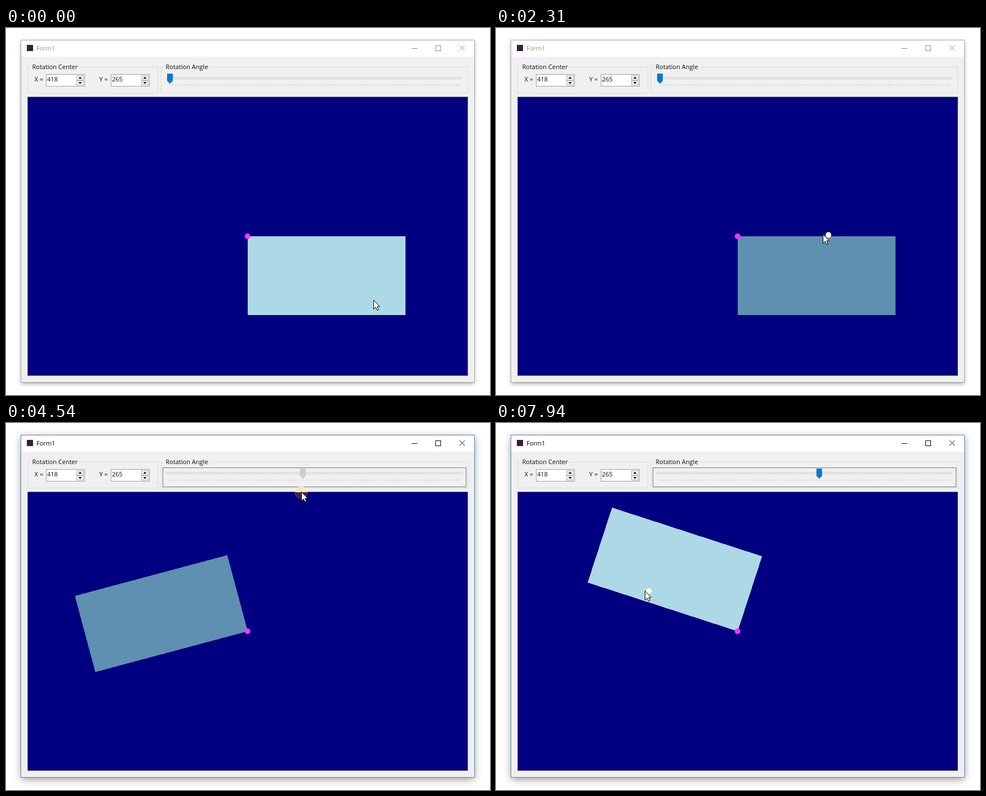
An HTML page for the animation above (8 s loop, 859 by 652 pixels).

```html
<!DOCTYPE html>
<html lang="en">
<head>
<meta charset="utf-8">
<title>Rotation demo</title>
<style>
  html, body { margin: 0; width: 100%; height: 100%; overflow: hidden; background: #fff; }
  svg { display: block; width: 100%; height: 100%; }
  text { font: 11px "Open Sans", "Noto Sans", sans-serif; fill: #0c0c1c; }
  .crisp { shape-rendering: crispEdges; }
  #shadowOn, #focus { visibility: hidden; }
  #frame { stroke: #a8a8a8; }
  #caption { fill: #999e6c; }
  #buttons { stroke: #8c8c8c; }
  .active #shadowOn, .active #focus { visibility: visible; }
  .active #shadowOff { visibility: hidden; }
  .active #frame { stroke: #5a89b0; }
  .active #caption { fill: #000; }
  .active #buttons { stroke: #000; }
</style>
</head>
<body>
<svg id="stage" viewBox="0 0 859 652">
  <defs>
    <clipPath id="panelClip"><rect x="39" y="123" width="780" height="494"/></clipPath>
    <filter id="soft" x="-5%" y="-5%" width="110%" height="112%">
      <feDropShadow dx="0" dy="2" stdDeviation="3.5" flood-color="#000" flood-opacity=".36"/>
    </filter>
    <filter id="deep" x="-5%" y="-5%" width="110%" height="112%">
      <feDropShadow dx="0" dy="3" stdDeviation="7" flood-color="#000" flood-opacity=".42"/>
    </filter>
    <g id="spinner">
      <rect x="71.5" y="82.5" width="68" height="21" fill="#fff" stroke="#a0a0a0"/>
      <rect x="125.5" y="84.5" width="12" height="8" fill="#f0f0f0" stroke="#b4b4b4"/>
      <rect x="125.5" y="93.5" width="12" height="8" fill="#f0f0f0" stroke="#b4b4b4"/>
      <path d="M128.5 90l3-3.5 3 3.5zM128.5 96l3 3.5 3-3.5z" fill="#111"/>
    </g>
  </defs>

  <rect id="shadowOff" x="27" y="22" width="804" height="608" fill="#fff" filter="url(#soft)"/>
  <rect id="shadowOn" x="27" y="22" width="804" height="608" fill="#fff" filter="url(#deep)"/>
  <g class="crisp">
    <rect id="frame" x="26.5" y="21.5" width="805" height="608" fill="#f0f0f0"/>
    <rect x="27" y="22" width="804" height="29" fill="#fff"/>
    <rect x="37" y="30" width="11" height="11" fill="#3a1c42"/>
  </g>
  <text id="caption" x="54" y="40">Form1</text>
  <g id="buttons" fill="none">
    <path d="M720 36.5h10M762.5 31.5h9v9h-9z" class="crisp"/>
    <path d="M805 31l9 9M814 31l-9 9"/>
  </g>

  <path d="M45 69.5H38.5V115.5H269.5V69.5H127M282 69.5H275.5V115.5H819.5V69.5H360" fill="none" stroke="#dcdcdc" class="crisp"/>
  <text x="46.5" y="73">Rotation Center</text>
  <text x="283.5" y="73">Rotation Angle</text>
  <use href="#spinner"/>
  <use href="#spinner" x="115"/>
  <text x="50.5" y="95">X =</text>
  <text x="73" y="95">418</text>
  <text x="165.5" y="95">Y =</text>
  <text x="188" y="95">265</text>

  <rect x="285.5" y="87.5" width="524" height="3" fill="#e7eaea" stroke="#d6d6d6" class="crisp"/>
  <path d="M290.5 101.5H806" stroke="#c2c2c2" stroke-width="3" stroke-dasharray="1 4.14"/>
  <rect id="focus" x="278.5" y="79.5" width="538" height="34" fill="none" stroke="#000" stroke-dasharray="1 1"/>
  <path id="thumb" d="M-5 81H5V94L0 99L-5 94z"/>

  <rect x="38.5" y="122.5" width="781" height="495" fill="#000080" stroke="#646464" class="crisp"/>
  <g clip-path="url(#panelClip)">
    <rect id="box" width="280" height="140" class="crisp"/>
    <circle cx="428.7" cy="370" r="5" fill="#ff33ff"/>
    <circle id="dot" r="5" fill="#ffffcc"/>
  </g>
  <g id="halo">
    <circle r="11" fill="#f0ebbd"/>
    <circle r="11" fill="#4b1d48" clip-path="url(#panelClip)"/>
  </g>
  <path id="arrow" d="M.5 .5V16.5L4.2 13L6.7 18.4L9.2 17.3L6.8 12H11.4z" stroke="#000"/>
</svg>

<script>
const LOOP = 8000, LAG = 60;
const PRESS = 2880, RELEASE = 4950;
const PIVOT = { x: 429, y: 370 };

// Slider drag: time, angle
const turn = [[PRESS, 0], [4030, 239], [4390, 165], [4540, 165], [4870, 198]];

// Pointer weaving over the edges before and after the drag: time, x, y
const before = [
  [0, 652, 483], [420, 575, 347], [840, 422, 440], [1000, 385, 480],
  [1190, 438, 483], [1440, 490, 535], [1680, 590, 504], [2000, 726, 425],
  [2150, 616, 360], [2310, 580, 366], [2530, 530, 262], [PRESS, 289, 94]
];
const after = [
  [RELEASE, 571, 122], [5400, 476, 268], [5630, 456, 280], [5900, 440, 285],
  [6450, 368, 354], [6650, 371, 363], [7030, 358, 347], [7270, 327, 318],
  [7500, 298, 338], [7640, 300, 304], [7940, 264, 298]
];

const $ = id => document.getElementById(id);
const [stage, box, dot, halo, arrow, thumb] =
  ["stage", "box", "dot", "halo", "arrow", "thumb"].map($);

// The key before t, clamped so that a next key exists.
const keyAt = (keys, t) =>
  Math.max(0, Math.min(keys.length - 2, keys.findLastIndex(k => k[0] <= t)));
const clamp = u => Math.max(0, Math.min(1, u));

function angleAt(t) {
  const i = keyAt(turn, t), [t0, a] = turn[i], [t1, b] = turn[i + 1];
  const u = clamp((t - t0) / (t1 - t0));
  return Math.round(a + (b - a) * (1 - Math.cos(Math.PI * u)) / 2);
}

// Smooth curve through the keys, with uneven spacing in time.
function curve(keys, t, col) {
  const last = keys.length - 1;
  const slope = n => {
    const a = keys[Math.max(n - 1, 0)], b = keys[Math.min(n + 1, last)];
    return (b[col] - a[col]) / (b[0] - a[0]);
  };
  const i = keyAt(keys, t), a = keys[i], b = keys[i + 1], d = b[0] - a[0];
  const u = clamp((t - a[0]) / d), v = 1 - u;
  return a[col] * v * v * (1 + 2 * u) + b[col] * u * u * (3 - 2 * u)
    + d * u * v * (slope(i) * v - slope(i + 1) * u);
}

const thumbX = angle => 291 + angle * 514 / 360;
const isDrag = t => t >= PRESS && t < RELEASE;

function pointer(t) {
  if (isDrag(t)) {
    return { x: thumbX(angleAt(t)) - 2.4, y: 94 + 28 * clamp((t - PRESS) / 900) };
  }
  const keys = t < PRESS ? before : after;
  return { x: curve(keys, t, 1), y: curve(keys, t, 2) };
}

function inBox(p, angle) {
  const a = angle * Math.PI / 180, dx = p.x - PIVOT.x, dy = p.y - PIVOT.y;
  const u = dx * Math.cos(a) + dy * Math.sin(a);
  const v = dy * Math.cos(a) - dx * Math.sin(a);
  return u >= 0 && u <= 280 && v >= 0 && v <= 140;
}

const place = (el, p) => el.setAttribute("transform", `translate(${p.x} ${p.y})`);
const show = (el, on) => el.setAttribute("visibility", on ? "visible" : "hidden");

function draw(t) {
  const angle = angleAt(t), drag = isDrag(t);
  const tip = pointer(t), trail = pointer(t - LAG);

  stage.classList.toggle("active", t >= PRESS);
  box.setAttribute("transform", `translate(${PIVOT.x} ${PIVOT.y}) rotate(${angle})`);
  box.setAttribute("fill", !drag && inBox(trail, angle) ? "#add8e6" : "#5f8fb1");
  place(thumb, { x: thumbX(angle), y: 0 });
  thumb.setAttribute("fill", drag ? "#cccccc" : "#0078d7");

  place(dot, trail);
  show(dot, t >= LAG && !drag && trail.y > 128);
  show(halo, drag);
  for (const c of halo.children) {
    c.setAttribute("cx", tip.x);
    c.setAttribute("cy", tip.y + 1.5);
  }
  place(arrow, { x: Math.round(tip.x), y: Math.round(tip.y) });
  arrow.setAttribute("fill", drag ? "#fffad6" : "#fff");
}

const start = performance.now();
function tick() {
  draw((performance.now() - start) % LOOP);
  requestAnimationFrame(tick);
}
tick();
</script>
</body>
</html>
```
